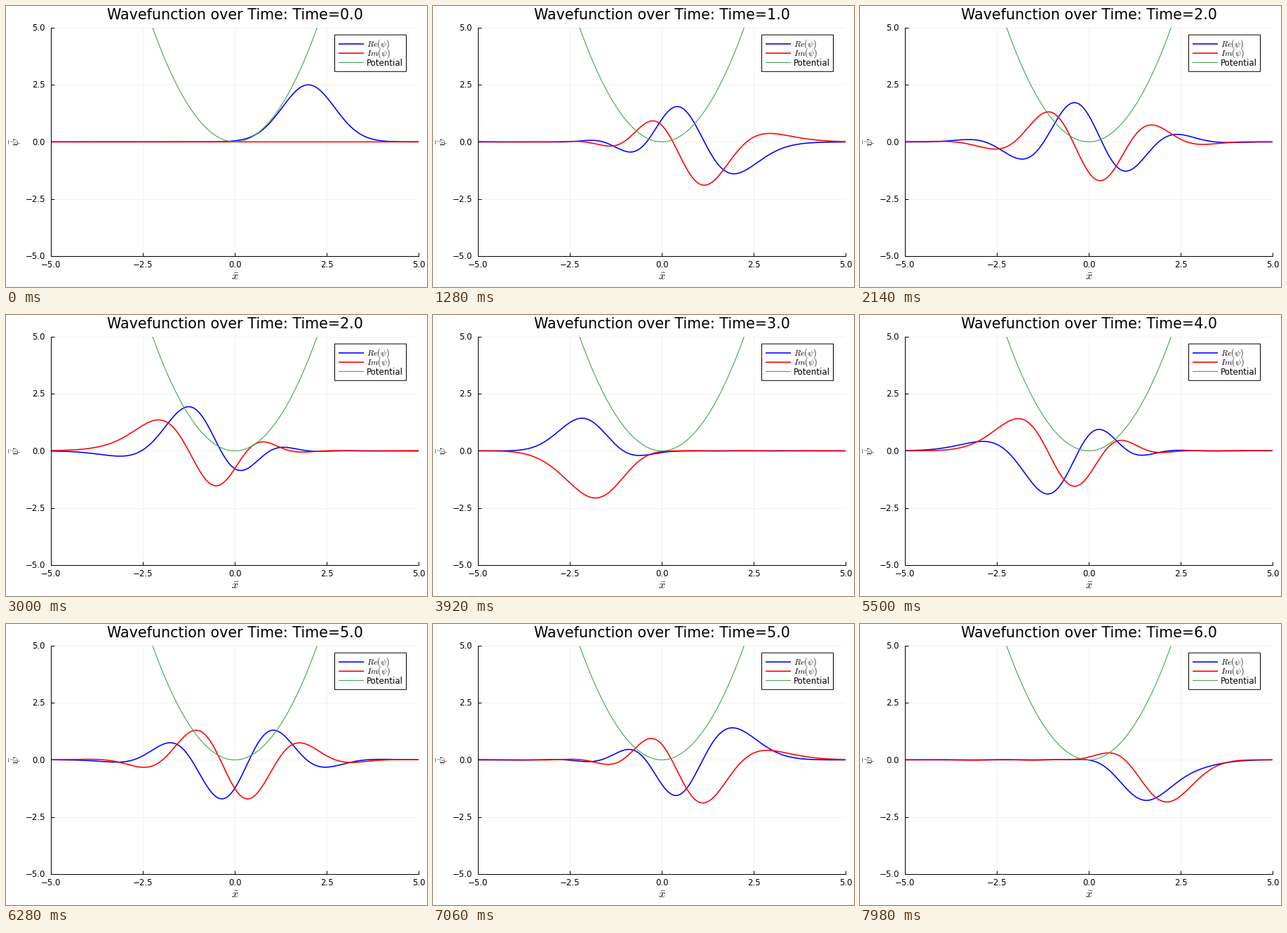
Animation of 600 by 400 pixels, one loop 8 s. Source, as a matplotlib script:

```python
import numpy as np
import matplotlib.pyplot as plt
from matplotlib.animation import FuncAnimation
from matplotlib.patches import Rectangle

W, H = 600, 400
FRAMES, INTERVAL = 400, 20
DT, SUBSTEPS = 0.015, 4
N, SPAN = 400, 10.0
PT = 0.72  # points per pixel at 100 dpi
BLUE, RED, GREEN = "#0000ff", "#ff0000", "#3da44d"
WAVE_W, POT_W = 1.6 * PT, 1.1 * PT
LEFT, RIGHT, TOP, BOTTOM = 64.1, 588.2, 30.9, 355.9

plt.rcParams["font.family"] = "DejaVu Sans"
plt.rcParams["mathtext.fontset"] = "cm"


def evolve():
    """Split-step evolution of a displaced Gaussian in a periodic box."""
    x = -SPAN / 2 + SPAN / N * np.arange(N)
    k = 2 * np.pi * np.fft.fftfreq(N, SPAN / N)
    h = DT / SUBSTEPS
    half_v = np.exp(-0.25j * h * x**2)
    kinetic = np.exp(-0.5j * h * k**2)
    psi = 2.5 * np.exp(-(x - 2) ** 2) + 0j
    states = []
    for _ in range(FRAMES):
        states.append(np.append(psi, psi[0]))
        for _ in range(SUBSTEPS):
            psi = half_v * np.fft.ifft(kinetic * np.fft.fft(half_v * psi))
    return np.append(x, SPAN / 2), states


xs, states = evolve()

fig = plt.figure(figsize=(W / 100, H / 100), dpi=100, facecolor="white")
ax = fig.add_axes([LEFT / W, 1 - BOTTOM / H,
                   (RIGHT - LEFT) / W, (BOTTOM - TOP) / H])
ax.set(xlim=(-5, 5), ylim=(-5, 5))
ax.set_axisbelow(True)
ax.spines[["top", "right"]].set_visible(False)
for side in ("left", "bottom"):
    ax.spines[side].set_linewidth(PT)


def label(x, y, text, size, ha="center", va="baseline", **kw):
    return fig.text(x / W, 1 - y / H, text, fontsize=size * PT,
                    ha=ha, va=va, color="black", **kw)


ticks = np.linspace(-5, 5, 5)
ax.set_xticks(ticks, [""] * 5)
ax.set_yticks(ticks, [""] * 5)
ax.tick_params(direction="in", length=5 * PT, width=PT)
ax.grid(color="black", alpha=0.05, linewidth=PT)
for v in ticks:
    text = f"{v:.1f}".replace("-", "\u2212")
    label(LEFT + (v + 5) * (RIGHT - LEFT) / 10, 371.8, text, 11.75)
    label(56.1, BOTTOM - (v + 5) * (BOTTOM - TOP) / 10 + 4.3, text, 11.75,
          ha="right")

title = label(326.6, 18.8, "", 20.66)
label(326.2, 390, r"$\bar{x}$", 16.2)
label(14, 193.4, r"$\bar{\psi}$", 16.2, va="center", rotation=90)

re_line, = ax.plot([], [], color=BLUE, lw=WAVE_W, snap=False)
im_line, = ax.plot([], [], color=RED, lw=WAVE_W, snap=False)
ax.plot(xs, xs**2, color=GREEN, lw=POT_W, snap=False)

# Legend, laid out in pixels
page = fig.add_axes([0, 0, 1, 1])
page.set(xlim=(0, W), ylim=(H, 0))
page.axis("off")
page.add_patch(Rectangle((468.5, 41.1), 102, 52.2, facecolor="white",
                         edgecolor="black", lw=PT, snap=False))
rows = [(54.0, BLUE, WAVE_W, r"$Re(\psi)$", 12.0, 3.8),
        (67.2, RED, WAVE_W, r"$Im(\psi)$", 12.0, 3.8),
        (80.4, GREEN, POT_W, "Potential", 11.75, 4.3)]
for y, color, width, text, size, drop in rows:
    page.plot([474, 510], [y, y], color=color, lw=width, snap=False,
              solid_capstyle="butt")
    label(513.9, y + drop, text, size, ha="left")


def update(i):
    psi = states[i]
    re_line.set_data(xs, psi.real)
    im_line.set_data(xs, psi.imag)
    title.set_text(f"Wavefunction over Time: Time={round(i * DT):.1f}")
    return re_line, im_line, title


anim = FuncAnimation(fig, update, frames=FRAMES, interval=INTERVAL,
                     repeat=True, repeat_delay=0)
plt.show()
```
